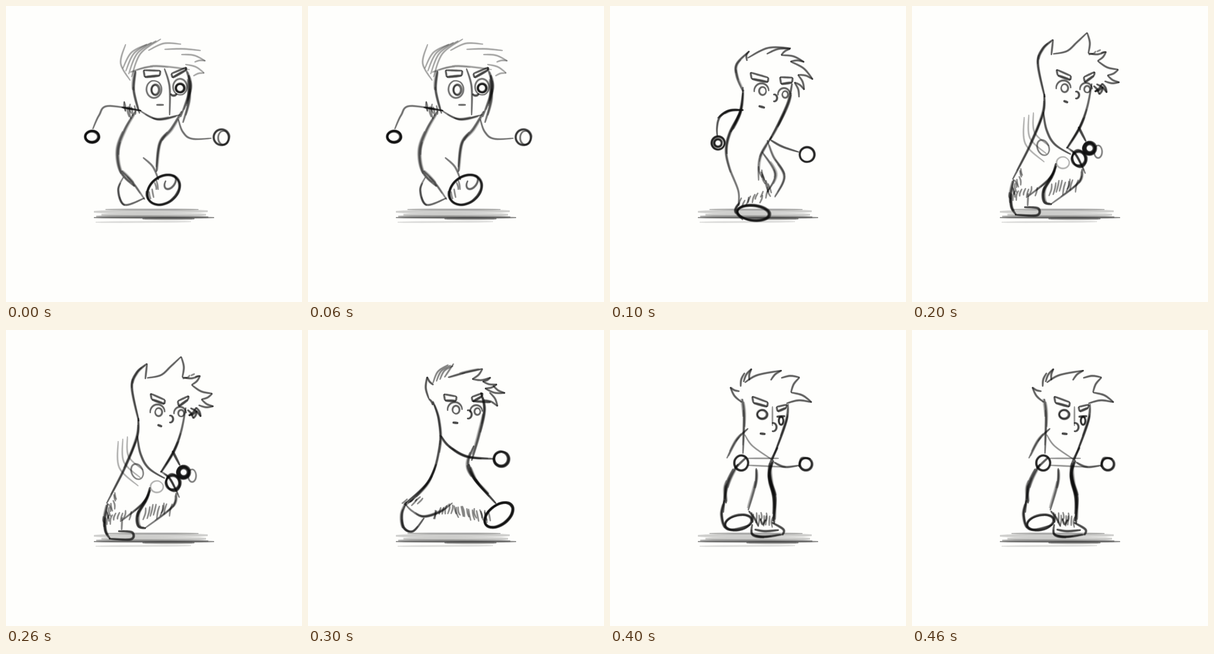
Animation, 512 px wide and 512 px high, one loop 0.5 s. Source, as an HTML page with a canvas:

```html
<!DOCTYPE html>
<html lang="en">
<head>
<meta charset="utf-8">
<title>Sketch run cycle</title>
<style>
html, body { margin: 0; width: 100%; height: 100%; overflow: hidden; background: #fefefc; }
canvas { display: block; width: 100vw; height: 100vh; }
</style>
</head>
<body>
<canvas id="stage" width="512" height="512"></canvas>
<script>
const STEP = 100, PAPER = '#fefefc', INK = '#0c0c0c';
const ctx = document.getElementById('stage').getContext('2d');
let seed = 1, width = 2, dark = 0.7;

const rnd = () => (seed = seed * 16807 % 2147483647) / 2147483647 - 0.5;
const pen = (w, a) => { width = w; dark = a; };

// Catmull-Rom samples through a flat list of coordinates
function curve(p) {
  const n = p.length / 2, out = [];
  const at = (i, k) => p[2 * Math.max(0, Math.min(n - 1, i)) + k];
  const mix = (i, t, k) => {
    const a = at(i - 1, k), b = at(i, k), c = at(i + 1, k), d = at(i + 2, k);
    return b + t / 2 * (c - a + t * (2 * a - 5 * b + 4 * c - d + t * (3 * (b - c) + d - a)));
  };
  for (let i = 0; i < n - 1; i++)
    for (let t = 0; t < 0.95; t += 0.1) out.push([mix(i, t, 0), mix(i, t, 1)]);
  out.push([at(n - 1, 0), at(n - 1, 1)]);
  return out;
}

// Filled outline of a line that thins out at both ends
function ribbon(pts, w, a) {
  const left = [], right = [], last = pts.length - 1;
  pts.forEach(([x, y], i) => {
    const [ax, ay] = pts[Math.max(0, i - 1)], [bx, by] = pts[Math.min(last, i + 1)];
    const r = w * (0.25 + 0.25 * Math.sqrt(Math.abs(Math.sin(Math.PI * i / last))));
    const f = r / (Math.hypot(bx - ax, by - ay) || 1);
    left.push([x + (ay - by) * f, y + (bx - ax) * f]);
    right.unshift([x - (ay - by) * f, y - (bx - ax) * f]);
  });
  ctx.globalAlpha = a;
  ctx.fillStyle = INK;
  ctx.beginPath();
  left.concat(right).forEach(q => ctx.lineTo(...q));
  ctx.fill();
}

// Soft pencil: three widths over each other
function trace(pts, a = dark) {
  if (pts.length < 2) return;
  for (const grow of [-0.6, 0.6, 2]) ribbon(pts, width + grow, a * 0.45);
}

const line = (...p) => trace(curve(p));

// Full line plus loose partial strokes beside it
function sketch(...p) {
  const pts = curve(p), n = pts.length;
  trace(pts, dark * 0.85);
  for (let i = 0; i < 3; i++) {
    const from = Math.floor((rnd() + 0.5) * n * 0.5), dx = rnd() * 5, dy = rnd() * 3;
    trace(pts.slice(from, from + Math.ceil(n * 0.5)).map(([x, y]) => [x + dx, y + dy]), dark * 0.4);
  }
}

// Bowed line; positive b bulges outward on a clockwise outline
const bend = (x0, y0, x1, y1, b = 0.12) =>
  line(x0, y0, (x0 + x1) / 2 + (y1 - y0) * b, (y0 + y1) / 2 + (x0 - x1) * b, x1, y1);

// Hair locks: bowed lines from point to point
function locks(...p) {
  for (let i = 0; i + 3 < p.length; i += 2) bend(...p.slice(i, i + 4), i % 4 ? -0.1 : 0.1);
}

function arc(x, y, rx, ry, from, to, tilt = 0) {
  const p = [], c = Math.cos(tilt), s = Math.sin(tilt);
  for (let i = 0; i <= 10; i++) {
    const t = from + (to - from) * i / 10, u = rx * Math.cos(t), v = ry * Math.sin(t);
    p.push(x + u * c - v * s, y + u * s + v * c);
  }
  line(...p);
}

function ring(x, y, rx, ry = rx, tilt = 0, passes = 2) {
  for (let i = 0; i < passes; i++) {
    const t = rnd() * 6, k = i ? rnd() * 3 : 0;
    arc(x + k / 2, y, rx + k, ry + k, t, t + 6.6, tilt);
  }
}

function eye(x, y, r) {
  pen(2.2, 0.7);
  ring(x, y, r, r * 1.15, 0, 1);
  arc(x - 2, y, r * 2.1, r * 2.2, 3, 6.3);
}

// Open box with a heavy lower edge
function brow(x0, y0, x1, y1, h) {
  pen(2.2, 0.75);
  line(x0, y0, x1, y1);
  line(x0, y0, x0 + 2, y0 + h);
  line(x1, y1, x1 - 1, y1 + h * 0.7);
  pen(3.2, 0.85);
  line(x0 + 2, y0 + h, x1 - 1, y1 + h * 0.7);
}

function nose(x, y, r) {
  pen(2.4, 0.85);
  arc(x, y, r, r * 1.2, -1.9, 1.9);
}

function mouth(x0, y0, x1, y1) {
  pen(3, 0.85);
  line(x0, y0, x1, y1);
}

// Line through the points up to the rim of a fist at the last one
function arm(r, ...p) {
  const [x, y] = p.slice(-2);
  trace(curve(p).filter(q => Math.hypot(q[0] - x, q[1] - y) > r));
  ring(x, y, r);
}

// Row of short hairs between two points
function fur(n, x0, y0, x1, y1, dx, dy) {
  pen(1.8, 0.5);
  for (let i = 0; i < n; i++) {
    const t = i / (n - 1), x = x0 + (x1 - x0) * t + rnd() * 5, y = y0 + (y1 - y0) * t + rnd() * 7;
    line(x, y, x + dx * 0.4 + rnd() * 4, y + dy * 0.5, x + dx, y + dy + rnd() * 6);
  }
}

function ground() {
  pen(2, 0.3);
  line(172, 352, 333, 352);
  pen(5, 0.15);
  line(152, 356, 349, 355);
  line(165, 361, 346, 361);
  pen(4, 0.25);
  line(156, 364, 350, 365);
  pen(2.2, 0.5);
  line(152, 366, 360, 366);
  pen(3, 0.4);
  line(236, 368, 326, 368);
  pen(2, 0.12);
  line(155, 374, 320, 373);
}

function leap() {
  pen(1.8, 0.35);
  bend(215, 129, 207, 66, 0.2);
  for (let i = 0; i < 4; i++) bend(202 + 5 * i, 108 + 5 * i, 244 + 8 * i, 66 - 3 * i, 0.15);
  bend(246, 77, 303, 66);
  bend(274, 75, 337, 77, 0.03);
  locks(303, 84, 345, 95, 326, 97);
  locks(310, 101, 343, 116, 324, 121);
  sketch(215, 114, 255, 104, 318, 110);
  brow(238, 111, 267, 112, 12);
  brow(286, 117, 312, 106, 7);
  pen(2, 0.6);
  ring(256, 144, 13, 15, 0, 1);
  ring(258, 145, 6, 8);
  ring(301, 140, 12, 14, 0, 1);
  pen(2.8, 0.8);
  ring(301, 142, 7);
  arc(290, 151, 5, 4, 0, 3);
  pen(2.2, 0.65);
  line(260, 171, 273, 171);
  line(274, 108, 283, 140, 283, 189);
  sketch(230, 180, 262, 196, 302, 188);
  pen(3, 0.65);
  sketch(224, 112, 221, 145, 231, 186);
  sketch(311, 108, 318, 142, 302, 192);
  sketch(316, 120, 317, 160, 306, 202);
  pen(2.2, 0.6);
  line(234, 181, 176, 173, 161, 189, 150, 213);
  sketch(200, 175, 234, 181);
  fur(7, 203, 168, 222, 174, 2, 18);
  pen(3, 0.8);
  ring(149, 226, 12, 10, 0, 3);
  pen(2.2, 0.6);
  arm(14, 298, 196, 306, 218, 324, 230, 373, 227);
  ring(376, 228, 9, 12, 0, 1);
  pen(3.2, 0.65);
  sketch(224, 182, 205, 214, 193, 250, 199, 288, 222, 312);
  sketch(304, 182, 286, 212, 266, 238, 260, 287);
  pen(2.4, 0.55);
  sketch(200, 285, 220, 306, 240, 335);
  line(237, 262, 254, 278, 264, 301);
  sketch(203, 296, 194, 318, 205, 344, 240, 332);
  pen(2.6, 0.65);
  ring(272, 318, 30, 22, -0.65, 3);
  arc(284, 305, 8, 13, -2, 3, 0.6);
  fur(5, 243, 322, 260, 304, 3, 16);
}

function contact() {
  pen(2.6, 0.65);
  sketch(230, 148, 219, 122, 219, 100, 241, 78);
  pen(2.2, 0.7);
  line(241, 78, 236, 85, 237, 95);
  bend(238, 90, 313, 73);
  locks(271, 83, 312, 74, 296, 85, 336, 97, 312, 96, 351, 127, 325, 119, 336, 145, 319, 132, 327, 158);
  brow(243, 115, 274, 124, 11);
  brow(294, 123, 316, 124, 12);
  eye(264, 147, 6);
  eye(303, 153, 5);
  nose(284, 159, 5);
  mouth(257, 173, 268, 176);
  pen(2.8, 0.65);
  sketch(230, 140, 226, 180, 207, 220, 201, 250, 207, 281, 222, 320, 222, 345);
  sketch(230, 150, 224, 185, 209, 218);
  pen(3.2, 0.8);
  sketch(315, 134, 308, 166, 291, 204, 276, 232);
  pen(2.6, 0.75);
  sketch(231, 180, 206, 181, 186, 194);
  arm(11, 231, 180, 206, 181, 190, 192, 185, 212, 187, 237);
  ring(187, 237, 7);
  arm(13, 278, 232, 300, 244, 341, 257);
  pen(2.4, 0.55);
  sketch(280, 226, 259, 262, 257, 302);
  sketch(272, 232, 282, 260, 302, 295, 285, 331);
  sketch(263, 252, 286, 290, 272, 322);
  fur(8, 258, 280, 274, 312, 6, 18);
  fur(9, 230, 334, 272, 320, -5, 14);
  pen(2.6, 0.7);
  ring(248, 358, 28, 13, 0.1, 3);
  sketch(224, 340, 217, 355, 230, 370);
}

function down() {
  pen(2.8, 0.75);
  sketch(230, 158, 218, 100, 226, 74, 244, 58);
  pen(2.2, 0.7);
  line(244, 58, 241, 85);
  line(244, 83, 268, 78, 285, 63, 303, 46);
  locks(303, 46, 305, 82, 336, 79, 321, 95, 357, 110, 338, 120, 359, 132, 333, 130);
  fur(4, 305, 83, 326, 80, 7, -3);
  pen(2.5, 0.75);
  locks(319, 135, 337, 150, 329, 134, 316, 148, 330, 140, 324, 153, 314, 138);
  brow(250, 110, 275, 121, 10);
  brow(297, 123, 316, 114, 9);
  eye(264, 142, 6);
  eye(303, 144, 5);
  nose(284, 154, 5);
  mouth(262, 164, 270, 167);
  pen(2.8, 0.75);
  sketch(229, 152, 227, 185, 205, 240, 174, 300);
  sketch(311, 134, 303, 175, 290, 210, 268, 246);
  arm(13, 227, 183, 233, 215, 249, 241, 289, 264);
  ring(289, 264, 11, 15, -0.3, 1);
  pen(3.2, 0.85);
  arm(11, 288, 209, 294, 221, 307, 246);
  ring(307, 246, 7);
  pen(1.8, 0.3);
  ring(322, 252, 7, 11);
  ring(261, 271, 11, 10, 0, 1);
  ring(227, 245, 10, 14, -0.4);
  for (let i = 0; i < 3; i++) bend(194 + 8 * i, 192 - 4 * i, 229 + 4 * i, 270 - 14 * i, -0.2);
  pen(2.4, 0.6);
  sketch(267, 244, 284, 258, 300, 290);
  sketch(294, 282, 288, 306, 240, 343);
  pen(3.6, 0.85);
  sketch(249, 272, 243, 292, 228, 318, 229, 339, 242, 343);
  pen(2.5, 0.65);
  sketch(250, 277, 236, 300, 200, 330);
  fur(9, 242, 305, 286, 300, -5, 20);
  fur(9, 187, 282, 171, 320, 3, 15);
  fur(7, 180, 318, 215, 314, -4, 15);
  pen(3.2, 0.85);
  sketch(176, 300, 171, 326, 172, 348, 180, 361);
  line(178, 361, 216, 362, 218, 350, 194, 348);
  pen(2.2, 0.5);
  line(201, 324, 200, 346);
}

function push() {
  pen(2.4, 0.75);
  locks(217, 95, 206, 81, 209, 119, 216, 130);
  pen(2, 0.5);
  for (let i = 0; i < 3; i++) bend(216 + 6 * i, 92 - 3 * i, 243 + 4 * i, 60 + i, 0.15);
  bend(252, 58, 236, 82, 0);
  pen(2.2, 0.7);
  sketch(242, 82, 270, 74, 302, 67);
  locks(302, 67, 284, 85, 316, 82, 302, 89, 327, 94, 306, 101, 341, 109, 320, 96);
  locks(314, 108, 328, 132, 304, 121);
  brow(235, 111, 257, 115, 11);
  brow(283, 116, 302, 109, 8);
  pen(3, 0.8);
  line(285, 123, 316, 125);
  eye(256, 138, 6);
  eye(293, 141, 5);
  nose(277, 146, 6);
  mouth(250, 160, 260, 161);
  pen(2.8, 0.7);
  sketch(216, 124, 226, 155, 228, 200, 211, 258, 166, 302);
  sketch(222, 232, 206, 266, 176, 298);
  pen(3.2, 0.75);
  sketch(299, 108, 305, 138, 296, 182, 283, 226);
  sketch(287, 200, 277, 230, 287, 256, 325, 300);
  sketch(278, 232, 290, 260, 312, 284);
  pen(3, 0.8);
  sketch(230, 183, 244, 201, 275, 219, 322, 223);
  pen(3.2, 0.9);
  ring(334, 223, 12);
  pen(2.4, 0.65);
  sketch(168, 301, 180, 313, 200, 323, 228, 315, 250, 299);
  fur(6, 174, 294, 198, 290, -10, 9);
  fur(7, 218, 312, 249, 303, -3, 14);
  fur(15, 252, 304, 312, 314, 4, 18);
  pen(3, 0.8);
  sketch(171, 297, 163, 318, 166, 342, 182, 348, 201, 325);
  ring(330, 320, 28, 17, -0.65, 3);
}

function pass() {
  pen(2.3, 0.7);
  locks(224, 106, 208, 99, 228, 125);
  locks(226, 98, 233, 74);
  locks(231, 90, 245, 67, 241, 87);
  line(233, 91, 255, 78, 297, 70);
  locks(278, 87, 297, 70);
  locks(296, 83, 328, 82, 313, 108, 349, 125, 305, 127);
  brow(246, 115, 273, 125, 11);
  brow(288, 133, 306, 129, 8);
  pen(2.3, 0.65);
  ring(263, 146, 8, 7);
  ring(296, 157, 4, 7);
  pen(3, 0.8);
  line(288, 150, 303, 149);
  nose(282, 168, 6);
  mouth(259, 179, 269, 180);
  pen(1.6, 0.45);
  line(281, 132, 281, 166);
  line(238, 222, 292, 222);
  line(238, 234, 304, 237);
  line(233, 181, 247, 201, 283, 226);
  pen(2.6, 0.7);
  sketch(229, 119, 232, 150, 230, 214);
  sketch(308, 128, 305, 157, 281, 223);
  pen(2.3, 0.6);
  sketch(239, 170, 219, 190, 202, 222);
  pen(2.8, 0.7);
  ring(227, 230, 12, 13);
  line(216, 239, 236, 220);
  arm(11, 284, 229, 304, 237, 339, 232);
  bend(327, 237, 347, 223, 0.4);
  pen(3, 0.65);
  sketch(221, 232, 207, 259, 199, 288, 196, 316);
  sketch(213, 240, 200, 270, 201, 300);
  pen(4, 0.8);
  sketch(290, 203, 277, 233, 278, 262, 286, 291, 282, 331);
  sketch(283, 226, 275, 250, 283, 290, 284, 335);
  pen(2.6, 0.7);
  sketch(253, 239, 252, 266, 239, 312);
  fur(10, 243, 316, 281, 320, -1, 18);
  pen(2.6, 0.75);
  line(240, 313, 250, 326, 257, 340);
  line(260, 326, 264, 336, 269, 328);
  sketch(198, 294, 193, 320, 204, 345, 243, 337);
  ring(222, 333, 23, 12, -0.22);
  pen(3, 0.8);
  sketch(246, 336, 246, 353, 266, 358, 297, 354);
  line(280, 333, 300, 345, 298, 355);
  line(250, 345, 268, 348, 292, 346);
}

const poses = [leap, contact, down, push, pass];
let shown = -1;

function draw(time) {
  const i = Math.floor(time / STEP) % poses.length;
  if (i === shown) return;
  shown = i;
  seed = 4100 + 977 * i;
  ctx.globalAlpha = 1;
  ctx.fillStyle = PAPER;
  ctx.fillRect(0, 0, 512, 512);
  ground();
  poses[i]();
}

const start = performance.now();
function tick() {
  draw(performance.now() - start);
  requestAnimationFrame(tick);
}
tick();
</script>
</body>
</html>
```
